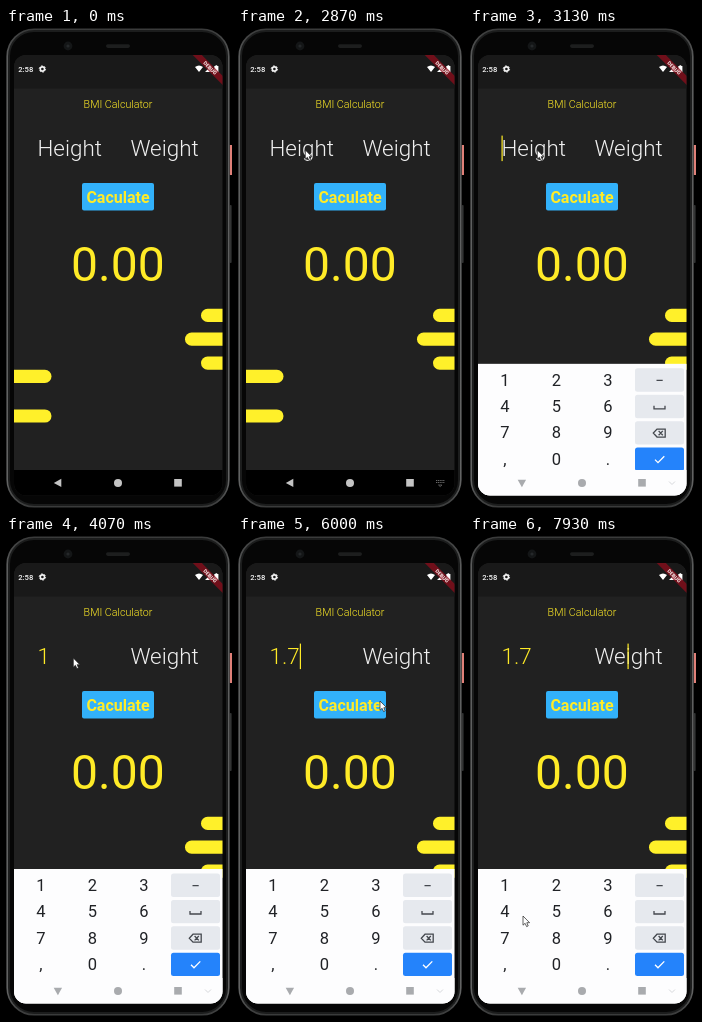
Animation, 226 px wide and 480 px high, one loop 8000 ms. Source, as an HTML page:

```html
<!DOCTYPE html>
<html lang="en">
<head>
<meta charset="utf-8">
<title>BMI Calculator</title>
<style>
  html, body { margin: 0; width: 100%; height: 100%; overflow: hidden; background: #000; }
  svg { display: block; width: 226px; height: 480px; font-family: Roboto, "Open Sans", sans-serif; }
  .light { font-weight: 300; }
  .yellow { fill: #ffeb27; }
  .mid { text-anchor: middle; }
</style>
</head>
<body>
<svg viewBox="0 0 226 480">
  <defs>
    <clipPath id="screen"><rect x="8" y="27" width="208.5" height="440.5" rx="12"/></clipPath>
    <linearGradient id="rim" x2="0" y2="1">
      <stop offset="0" stop-color="#3a3b3b"/>
      <stop offset=".06" stop-color="#5c5d5d"/>
      <stop offset=".95" stop-color="#626363"/>
      <stop offset="1" stop-color="#3a3b3b"/>
    </linearGradient>
  </defs>

  <!-- phone body -->
  <rect width="226" height="480" fill="#000"/>
  <rect x="223.8" y="117" width="2.2" height="30" fill="#e08078"/>
  <rect x="223.8" y="177" width="1.8" height="58" rx=".8" fill="#333434"/>
  <rect x="1.2" y="1.2" width="221.6" height="477.6" rx="27" fill="#1c1d1d" stroke="url(#rim)" stroke-width="1.6"/>
  <rect x="4" y="4" width="216" height="472" rx="24" fill="#060606"/>
  <rect x="100" y="16.3" width="24" height="3.6" rx="1.8" fill="#1d1e1e"/>
  <circle cx="62" cy="18" r="4.4" fill="#141617"/>
  <circle cx="62" cy="18" r="1.6" fill="#25282a"/>

  <g clip-path="url(#screen)">
    <rect x="8" y="27" width="209" height="441" fill="#212121"/>
    <rect x="8" y="27" width="209" height="33.5" fill="#191919"/>

    <!-- status bar -->
    <text x="12.2" y="43.7" font-size="7.7" font-weight="500" fill="#f2f2f2">2:58</text>
    <circle cx="36.4" cy="41" r="2.1" fill="none" stroke="#f2f2f2" stroke-width="1.6"/>
    <circle cx="36.4" cy="41" r="3.2" fill="none" stroke="#f2f2f2" stroke-width="1" stroke-dasharray="1.5 1.85"/>
    <path d="M189 39.1Q193 35.8 197 39.1L193 44.1ZM199 44.1L205 38.1V44.1ZM208.3 38.1H209.5V37.3H211.2V38.1H212.4V44.3H208.3Z" fill="#fff"/>

    <g transform="translate(217 27) rotate(45)">
      <rect x="-24" y="15" width="48" height="6.4" fill="#8e0d1b" opacity=".75"/>
      <text class="mid" y="20.1" font-size="5.2" font-weight="900" fill="#efd9d9">DEBUG</text>
    </g>

    <!-- app -->
    <text class="light yellow mid" x="112" y="79.6" font-size="10.7">BMI Calculator</text>
    <text id="height" class="light" x="31.5" y="128" font-size="22.4"></text>
    <text class="light" x="124.4" y="128" font-size="22.4" fill="#f0f0f0">Weight</text>
    <rect id="caret" y="107.6" width="1.2" height="25.5" class="yellow"/>
    <rect x="76" y="155" width="72" height="27.6" rx="2" fill="#32b1fa"/>
    <text class="yellow mid" x="112" y="174.6" font-size="16" font-weight="700">Caculate</text>
    <text class="yellow mid" x="111.9" y="253" font-size="48">0.00</text>
    <g fill="#fff02a">
      <rect x="195" y="280.8" width="40" height="13.2" rx="6.6"/>
      <rect x="179" y="304.6" width="50" height="13.2" rx="6.6"/>
      <rect x="195" y="328.5" width="40" height="13.2" rx="6.6"/>
      <rect x="-10" y="341.8" width="55.5" height="13.2" rx="6.6"/>
      <rect x="-10" y="381.4" width="55.5" height="13.2" rx="6.6"/>
    </g>

    <g id="keys"><rect x="8" y="333" width="209" height="136" fill="#fdfdfe"/></g>

    <!-- navigation bar -->
    <rect id="bar" x="8" y="442" width="209" height="26"/>
    <g id="nav">
      <path id="back" d="M55.3 450.7V459.1L47.8 454.9Z"/>
      <circle cx="112" cy="454.9" r="4"/>
      <rect x="168.2" y="451" width="7.6" height="7.6"/>
    </g>
    <g id="imeIcon" fill="none" stroke="#666" stroke-width="1">
      <path d="M198 452.5H206.5M198 454.5H206.5" stroke-dasharray="1.2 .6"/>
      <path d="M200.5 457H204L202.2 458.6Z" stroke-width=".8"/>
    </g>
    <path id="hide" d="M199 453.5L202 456.5L205 453.5" fill="none" stroke="#d5d7da" stroke-width="1"/>
  </g>

  <path id="mouse" d="M0 0V9.2L2.1 7.3L3.6 10.6L5.2 9.9L3.8 6.7H6.6Z" fill="#fff" stroke="#222" stroke-width=".7"/>
</svg>
<script>
const $ = id => document.getElementById(id);
const LOOP = 8000;

function add(parent, tag, attrs, text) {
  const el = document.createElementNS("http://www.w3.org/2000/svg", tag);
  for (const k in attrs) el.setAttribute(k, attrs[k]);
  if (text) el.textContent = text;
  parent.appendChild(el);
}

// number pad
const rowY = r => 349.3 + r * 26.4;
["123", "456", "789", ",0."].forEach((row, r) => {
  [...row].forEach((ch, c) => add($("keys"), "text",
    { x: 34.8 + c * 51.6, y: rowY(r) + 5.5, "font-size": 16.5, fill: "#202226", class: "mid" }, ch));
  add($("keys"), "rect", { x: 165, y: rowY(r) - 11.8, width: 49, height: 23.4, rx: 2.5,
    fill: r === 3 ? "#2483fb" : "#e6e9ee" });
});
const icon = (d, color = "#44484e") => add($("keys"), "path",
  { d, fill: "none", stroke: color, "stroke-width": 1.3 });
icon("M186.5 349.6H192.7");
icon("M184 375V378H195V375");
icon("M187 398.2H195.2V406.2H187L183.3 402.2ZM188.6 400L192.8 404.4M192.8 400L188.6 404.4");
icon("M185 428.8L188 431.8L194.3 425.4", "#fff");

// time, x, y of the pointer tip
const path = [
  [1270, 138, 57.5], [1600, 130, 72], [2270, 130, 72], [2670, 67.3, 122],
  [5600, 67.3, 122], [5870, 142, 165], [6070, 142, 165], [6400, 138, 119],
  [6670, 138, 119], [7200, 62, 362], [7470, 47, 386], [7600, 47, 386], [7900, 53, 380]
];
// time, typed text
const typed = [[0, ""], [4000, "1"], [4870, "1."], [5270, "1.7"]];
// from, to, caret x
const carets = [
  [3070, 3600, 31.5], [4470, 4870, 44.3], [4870, 5000, 50],
  [5470, 6070, 61.8], [6470, 6970, 157.5], [7470, 8000, 157.5]
];

const ease = p => p * p * (3 - 2 * p);

function pointer(t) {
  const i = path.findIndex(k => k[0] > t);
  if (i < 0) return path[path.length - 1].slice(1);
  const [t0, x0, y0] = path[i - 1], [t1, x1, y1] = path[i];
  const p = ease((t - t0) / (t1 - t0));
  return [x0 + (x1 - x0) * p, y0 + (y1 - y0) * p];
}

const show = (el, on) => el.setAttribute("visibility", on ? "visible" : "hidden");

function draw(t) {
  const mouse = $("mouse"), seen = t >= path[0][0];
  show(mouse, seen);
  if (seen) mouse.setAttribute("transform", `translate(${pointer(t)})`);

  const text = typed.filter(k => k[0] <= t).pop()[1];
  $("height").textContent = text || "Height";
  $("height").setAttribute("fill", text ? "#ffeb27" : "#f0f0f0");

  const caret = carets.find(c => t >= c[0] && t < c[1]);
  show($("caret"), caret);
  if (caret) $("caret").setAttribute("x", caret[2]);

  const rise = Math.min(1, Math.max(0, (t - 2900) / 270));
  const open = t >= 2930;
  $("keys").setAttribute("transform", `translate(0 ${136 * (1 - rise) ** 2})`);
  show($("keys"), rise > 0);
  $("bar").setAttribute("fill", open ? "#fdfdfe" : "#000");
  $("nav").setAttribute("fill", open ? "#a9abae" : "#c4c4c4");
  $("back").setAttribute("transform", open ? "rotate(-90 52 455)" : "");
  show($("imeIcon"), t >= 2870 && !open);
  show($("hide"), open);
}

const start = performance.now();
function tick() {
  draw((performance.now() - start) % LOOP);
  requestAnimationFrame(tick);
}
tick();
</script>
</body>
</html>
```
